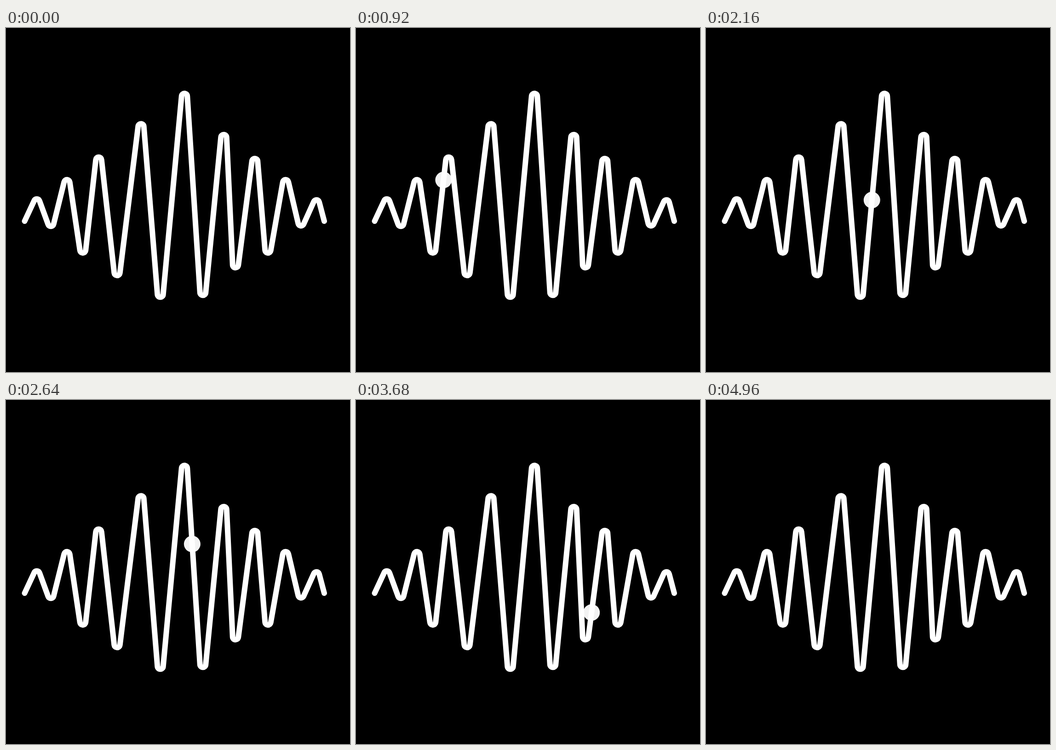
An HTML page that plays this animation: 748 px wide and 748 px high, repeating every 5080 ms.

```html
<!DOCTYPE html>
<html lang="en">
<head>
<meta charset="utf-8">
<title>Ball on a wave</title>
<style>
  html, body { margin: 0; height: 100%; overflow: hidden; background: #000; }
  svg { display: block; width: 100vw; height: 100vh; }
</style>
</head>
<body>
<svg viewBox="0 0 748 748">
  <circle id="ball" r="18" fill="#f2f2f2"/>
  <path id="wave" fill="none" stroke="#fff" stroke-width="12" stroke-linecap="round" stroke-linejoin="round"/>
</svg>
<script>
const LOOP = 5080, TRAVEL = 4960, STEP = 40, RADIUS = 6.25;
const ball = document.getElementById('ball');
const wave = document.getElementById('wave');

// The line is wound like a string around these pegs, alternately over and under.
const pegs = [
  [40.5, 420], [67, 378], [97.5, 425], [132.5, 336], [167, 483], [201.5, 287],
  [241.5, 532], [293.5, 214.5], [335.5, 579], [388, 148.5], [428, 575],
  [473.5, 238], [499, 515], [541, 290], [569.5, 483], [608, 336],
  [641.5, 424], [675, 380], [692, 420]
];

// Signed radius: positive over a peak, negative under a valley, zero at the ends.
function turn(i) {
  if (i === 0 || i === pegs.length - 1) return 0;
  return i % 2 ? RADIUS : -RADIUS;
}

function buildWave() {
  let d = '';
  for (let i = 0; i < pegs.length - 1; i++) {
    const [x1, y1] = pegs[i], [x2, y2] = pegs[i + 1];
    const k1 = turn(i), k2 = turn(i + 1);
    const dx = x2 - x1, dy = y2 - y1;
    const angle = Math.atan2(dy, dx) + Math.asin((k1 - k2) / Math.hypot(dx, dy));
    const nx = Math.sin(angle), ny = -Math.cos(angle);
    const start = `${x1 + nx * k1} ${y1 + ny * k1}`;
    const end = `${x2 + nx * k2} ${y2 + ny * k2}`;
    d += i ? `A${RADIUS} ${RADIUS} 0 0 ${k1 > 0 ? 1 : 0} ${start}` : `M${start}`;
    d += `L${end}`;
  }
  wave.setAttribute('d', d);
}

// Slow at both ends, with a slight lull in the middle.
function ease(u) {
  const a = Math.PI * u;
  return u + 0.023 * Math.sin(a) - 0.046 * Math.sin(2 * a) - 0.02 * Math.sin(4 * a);
}

function draw() {
  const t = Math.floor(performance.now() % LOOP / STEP) * STEP;
  const moving = t > 0 && t < TRAVEL;
  ball.style.display = moving ? '' : 'none';
  if (moving) {
    const p = wave.getPointAtLength(ease(t / TRAVEL) * wave.getTotalLength());
    ball.setAttribute('cx', p.x);
    ball.setAttribute('cy', p.y);
  }
  requestAnimationFrame(draw);
}

buildWave();
draw();
</script>
</body>
</html>
```
